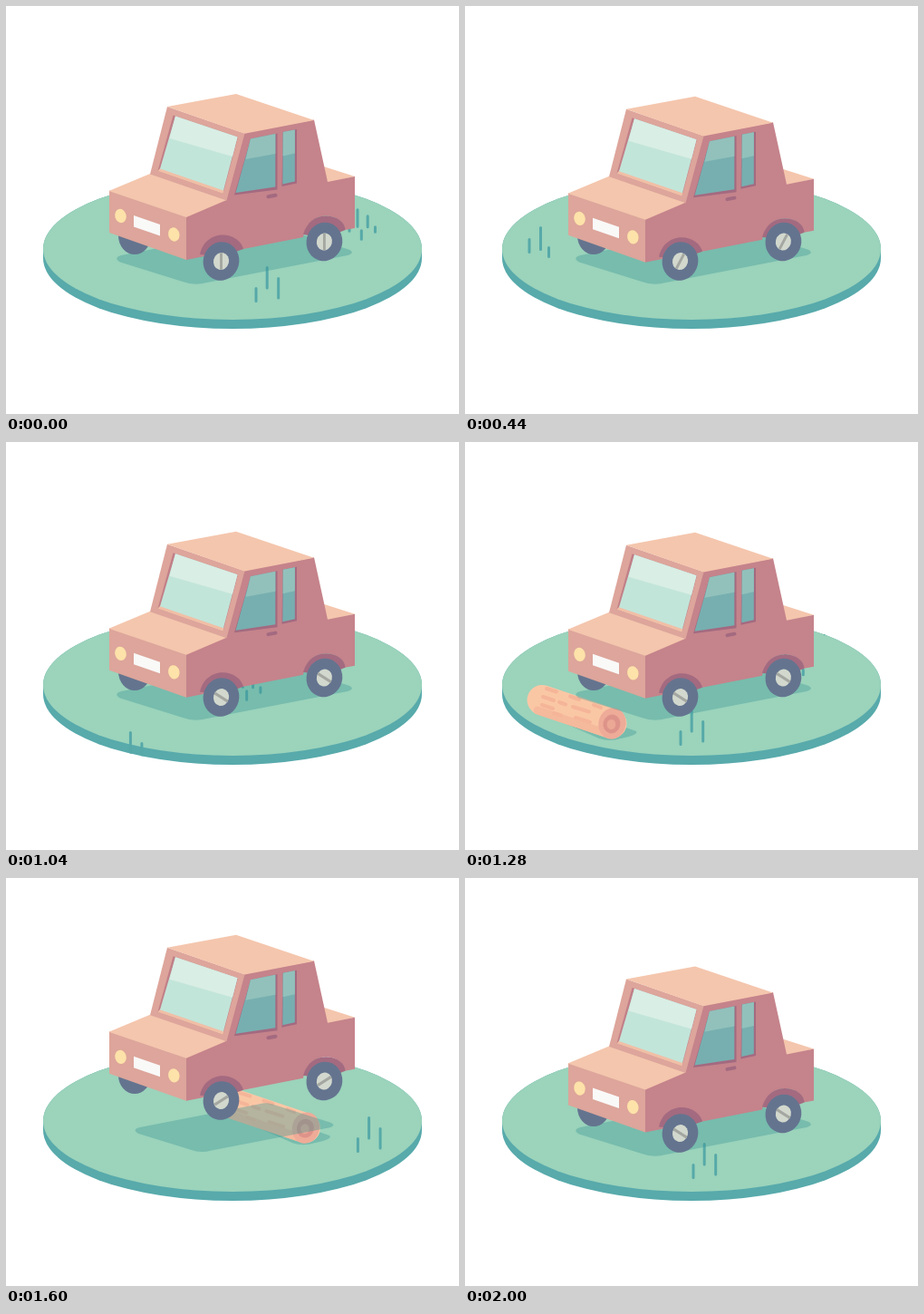
An HTML page for the animation above (2040 ms loop, 500 px wide and 450 px high).

```html
<!DOCTYPE html>
<html lang="en">
<head>
<meta charset="utf-8">
<title>Little car</title>
<style>
  html, body { margin: 0; width: 100%; height: 100%; overflow: hidden; background: #fff; }
  svg { display: block; width: 500px; height: 450px; }
  .grass path { stroke: #56a9a8; stroke-width: 3; stroke-linecap: round; fill: none; }
  .shade { fill: #389492; fill-opacity: .36; }
  .light { fill: #f4c6ad; }
  .front { fill: #dda59b; }
  .side { fill: #c5838b; }
  .dark { fill: #a36a80; }
  .lamp { fill: #fde2a9; }
  .tyre { fill: #64748f; }
  .bark path { stroke: #f5b598; stroke-width: 4; stroke-linecap: round; fill: none; }
</style>
</head>
<body>
<svg viewBox="0 0 500 450">
  <defs>
    <clipPath id="disc">
      <path d="M41 268A209 78 0 0 1 459 268V278A209 78 0 0 1 41 278Z"/>
    </clipPath>
    <path id="puff" fill="#d5ebe0" d="M0 0C5 0 8-2 10-3C11-7 17-9 20-5C24-5 28 1 29 5C20 7 7 5 0 0Z"/>
    <g id="wheel">
      <ellipse class="tyre" rx="19.8" ry="21.4" transform="rotate(14)"/>
      <ellipse fill="#d2d8cd" rx="8.5" ry="9.6" transform="rotate(14)"/>
    </g>
  </defs>

  <path fill="#58aaab" d="M41 268A209 78 0 0 1 459 268V278A209 78 0 0 1 41 278Z"/>
  <ellipse cx="250" cy="268" rx="209" ry="78" fill="#9bd3bb"/>

  <g clip-path="url(#disc)">
    <g id="grass" class="grass"></g>
    <g id="log">
      <path class="shade" d="M80 297L148 327Q160 331 172 327Q192 323 189 319L172 313Z"/>
      <path d="M85 284.5L162 310.5" stroke="#fac7a5" stroke-width="33" stroke-linecap="round"/>
      <path d="M80 296L155 321" stroke="#f5b99c" stroke-width="9" stroke-linecap="round"/>
      <g class="bark">
        <path d="M90 272L101 275.5M116 280.5L126 284M86 281L98 285M119 292L137 297.5M85 290L97 294M104 287L111 289.500M98 299L106 301.500M122 304L138 309M142 290L150 293"/>
      </g>
      <ellipse cx="162.500" cy="310.500" rx="15" ry="17.300" fill="#eeab98" transform="rotate(14 162.500 310.500)"/>
      <ellipse cx="162" cy="311" rx="9.500" ry="10.500" fill="#de938a" transform="rotate(14 162 311)"/>
      <ellipse cx="161.500" cy="311.500" rx="4.800" ry="5.500" fill="#eba895"/>
    </g>
  </g>

  <path id="shadow" class="shade" d="M127 275L285 244Q293 242 301 244L378 268.500Q386 272 377 275L222 305Q208 309 195 304L126 282.500Q118 278 127 275Z"/>

  <g id="farWheel"><ellipse class="tyre" cx="142" cy="253.500" rx="18" ry="20.500"/></g>

  <g id="body">
    <path class="light" d="M349 176.500L385 188L355 195Z"/>
    <path class="side" d="M263 140L340 125.500L355 194L385 188V245L374 247C374 238 364 231.500 353 231.500C340 231.500 331 241 328 255L262 268L214 277L199 280V232L243 213Z"/>
    <path class="dark" d="M214 274C217 259 229 252.500 239 252.500C251 252.500 260 260 262 268L240 276Z"/>
    <path class="dark" d="M328 252C332 238 342 231.500 353 231.500C365 231.500 374 238 374.500 247L352 256Z"/>
    <path class="front" d="M114 203.500L199 232.500V280L114 250Z"/>
    <path class="light" d="M159 185L243.500 214L199 233L113.500 204Z"/>
    <path class="front" d="M178 111L263.500 140.500L243.500 214.500L159 185.500Z"/>
    <path class="light" d="M178 111L254 97L340 126L263.500 140.700Z"/>

    <path fill="#c17f88" d="M184.500 120.500L256 144.500L239.500 207L167.500 182Z"/>
    <path fill="#f0bfa6" d="M170.500 178.500L240.500 203L239.500 207L167.500 182Z"/>
    <path fill="#c2e5d9" d="M187 121.500L255.500 144.500L240 203.500L170 179.500Z"/>
    <path fill="#d9eee5" d="M187 121.500L255.500 144.500L250 166L180.500 146Z"/>

    <path class="dark" d="M270 146.500L299.500 140.500V202.500L252 208.500Z"/>
    <path fill="#77afb0" d="M270 146.500L297.300 141V199.500L253.500 206Z"/>
    <path fill="#92c1bb" d="M270 146.500L297.300 141V163L264.500 169Z"/>
    <path class="dark" d="M305.500 139L321 136V195.500L304.500 199Z"/>
    <path fill="#77afb0" d="M305.800 139L318.800 136.500V193.500L305.300 196.500Z"/>
    <path fill="#92c1bb" d="M305.800 139L318.800 136.500V162.500L305.600 165.500Z"/>
    <path d="M289.500 210.300L297.500 208.800" stroke="#a36a80" stroke-width="4" stroke-linecap="round"/>

    <ellipse class="lamp" cx="126.500" cy="231.500" rx="6.200" ry="7.700" transform="rotate(-14 126.500 231.500)"/>
    <ellipse class="lamp" cx="185.300" cy="252" rx="6.200" ry="7.700" transform="rotate(-14 185.300 252)"/>
    <path fill="#f9f9f8" d="M141 231L170 241V253.500L141 243.500Z"/>
  </g>

  <g id="wheels">
    <g transform="translate(237.500 281.500)">
      <use href="#wheel"/>
      <g transform="scale(.9 1)"><path class="spoke" d="M-9.300 0H9.300" stroke="#a4a7a1" stroke-width="3.200"/></g>
    </g>
    <g transform="translate(351.400 260)">
      <use href="#wheel"/>
      <g transform="scale(.9 1)"><path class="spoke" d="M-9.300 0H9.300" stroke="#a4a7a1" stroke-width="3.200"/></g>
    </g>
  </g>

  <g id="dust">
    <use href="#puff" transform="translate(233 303)"/>
    <use href="#puff" transform="translate(351 281) scale(1.450)"/>
  </g>
</svg>
<script>
  const LOOP = 2040, TICK = 40, SLOPE = -0.213;
  const $ = id => document.getElementById(id);
  const move = (el, x, y) => el.setAttribute('transform', `translate(${x} ${y})`);

  // Blades: x, top, bottom
  const near = [[238, 318, 335], [250.2, 295, 320.5], [262.7, 307, 331.5]];
  const mid = [[160, 283, 296.5], [169, 270, 291.5], [180.2, 277, 292], [173.3, 293, 305.5], [188.5, 289, 297.5]];
  const far = [[71, 256, 273], [83.5, 243, 270], [92.5, 265, 278]];

  // Each tuft passes its drawn place, plus dx, at the given tick
  const tufts = [
    { blades: near, speed: 18.8, at: 0, dx: 38 },
    { blades: near, speed: 18.8, at: 32, dx: 0 },
    { blades: near, speed: 18.8, at: 50, dx: 14 },
    { blades: mid, speed: 15.4, at: 0, dx: 219 },
    { blades: mid, speed: 15.4, at: 20, dx: 0 },
    { blades: far, speed: 14.5, at: 11, dx: 0 }
  ];
  for (const t of tufts) {
    t.el = document.createElementNS('http://www.w3.org/2000/svg', 'path');
    t.el.setAttribute('d', t.blades.map(([x, a, b]) => `M${x} ${a + 1.5}V${b - 1.5}`).join(''));
    $('grass').append(t.el);
  }

  const spokes = document.querySelectorAll('.spoke');

  function jump(n) {
    const u = (n - 32.9) / 10.4;
    return u > 0 && u < 1 ? 25.5 * (1 - Math.cos(2 * Math.PI * u)) : 0;
  }

  function draw(n) {
    for (const t of tufts) {
      const x = t.dx + t.speed * (n - t.at);
      move(t.el, x, x * SLOPE);
    }
    const logX = 21.05 * (n - 32);
    move($('log'), logX, logX * -0.207);

    const up = jump(n);
    const bob = 1.5 * (1 - Math.cos(2 * Math.PI * n / 7));
    move($('body'), 0, bob - up);
    move($('wheels'), 0, -up);
    move($('farWheel'), 0, -up);
    for (const s of spokes) s.setAttribute('transform', `rotate(${-90 - 30 * n})`);

    const size = 1 - 0.2 * up / 46;
    $('shadow').setAttribute('transform', `translate(252 277) scale(${size}) translate(-252 -277)`);

    const age = n - 43;
    $('dust').setAttribute('opacity', age < 0 ? 0 : Math.max(0, 0.85 - age * 0.2));
    move($('dust'), Math.max(0, age) * 9, Math.max(0, age) * -2);
  }

  const start = performance.now();
  function loop() {
    const t = Math.max(0, performance.now() - start) % LOOP;
    draw(Math.floor(t / TICK));
    requestAnimationFrame(loop);
  }
  loop();
</script>
</body>
</html>
```
